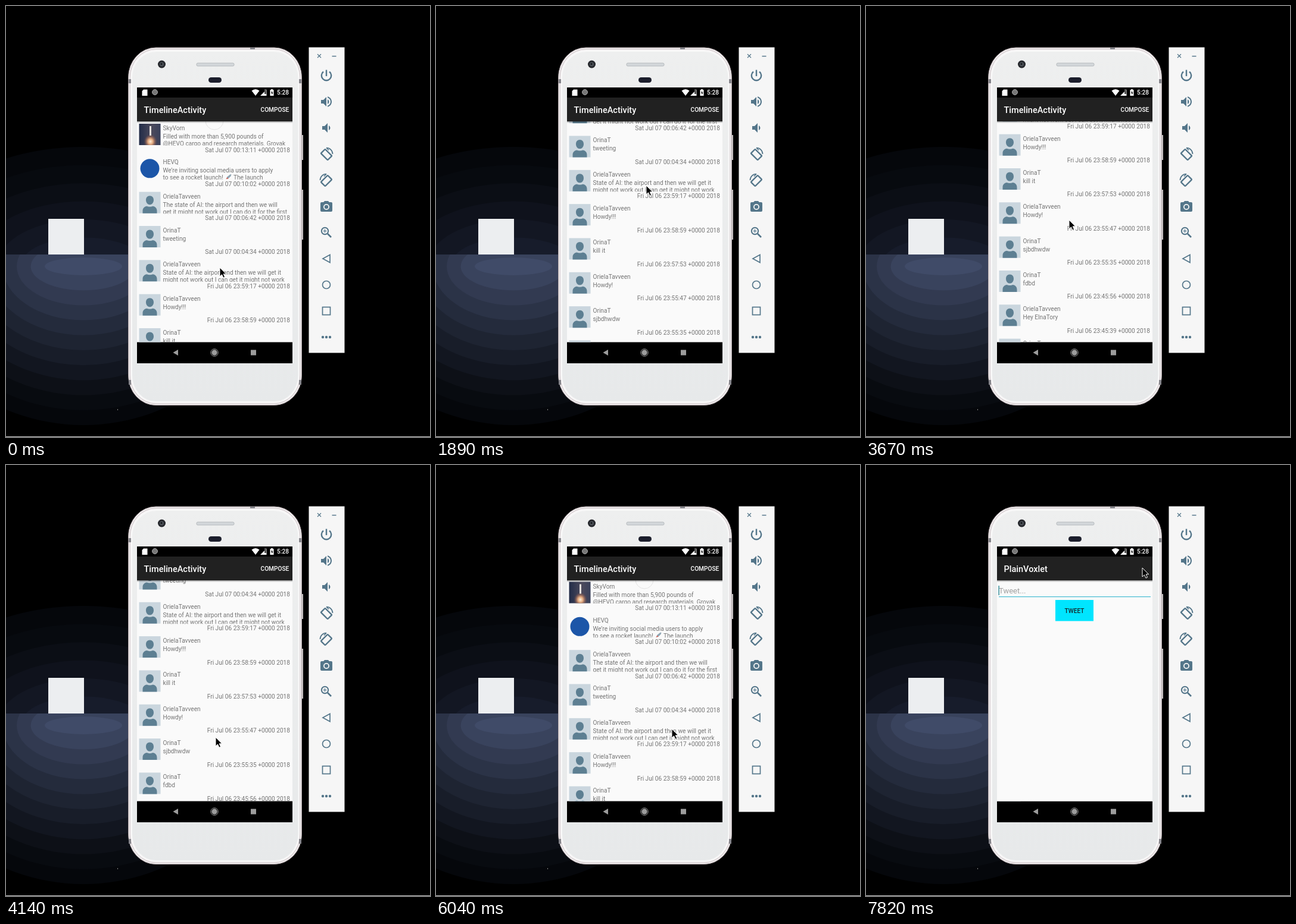
These frames come from a looping animation (712x725 px, 8 s). An HTML page:

```html
<!DOCTYPE html>
<html lang="en">
<head>
<meta charset="utf-8">
<title>Timeline</title>
<style>
html, body { margin: 0; height: 100%; overflow: hidden; background: #000; }
#stage { display: block; width: 100vw; height: 100vh; }
text { font: 10.15px Roboto, sans-serif; fill: #757575; }
.bar { font-size: 14.5px; font-weight: 500; fill: #fff; }
.med { font-weight: 500; fill: #fff; }
.line { fill: none; stroke: #54768a; }
.solid { fill: #54768a; }
</style>
</head>
<body>
<svg id="stage" viewBox="0 0 712 725">
  <defs>
    <linearGradient id="body" x2="0" y2="1">
      <stop stop-color="#eeefef"/><stop offset="1" stop-color="#e7e9ea"/>
    </linearGradient>
    <linearGradient id="sky">
      <stop stop-color="#222c48"/><stop offset=".6" stop-color="#4c4a5c"/><stop offset="1" stop-color="#39405a"/>
    </linearGradient>
    <radialGradient id="fire" cx=".5" cy=".75" r=".5">
      <stop stop-color="#fff0da"/><stop offset=".4" stop-color="#e0a67c"/><stop offset="1" stop-color="#8a4a3c" stop-opacity="0"/>
    </radialGradient>
    <linearGradient id="shade" x2="0" y2="1">
      <stop stop-opacity=".4"/><stop offset="1" stop-opacity="0"/>
    </linearGradient>
    <g id="person">
      <rect width="36" height="36" fill="#cad6de"/>
      <path fill="#5d7f92" d="M18 6.500c4 0 6.500 3 6.500 7.200S22 21.500 18 21.500s-6.500-3.600-6.500-7.800S14 6.500 18 6.500ZM6 36v-4c0-4.800 3-7.400 7-8 3 1.400 7 1.400 10 0 4 .6 7 3.200 7 8v4Z"/>
    </g>
    <g id="launch">
      <rect width="36" height="36" fill="url(#sky)"/>
      <rect x="8" y="12" width="22" height="24" fill="url(#fire)"/>
      <rect x="17.500" y="4" width="3" height="16" fill="#e4dfdc"/>
    </g>
    <circle id="badge" cx="18" cy="18" r="16" fill="#1c56a8"/>
    <g id="turn">
      <rect class="line" x="-5" y="-8" width="10" height="16" rx="1" stroke-width="2.400" transform="translate(0 1) rotate(-45)"/>
      <path class="line" stroke-width="1.700" d="M0-10.500A10.500 10.500 0 0 1 10.500 0M0-10.500l4 4"/>
    </g>
  </defs>

  <rect width="712" height="725"/>
  <svg id="upper" width="712" height="418"></svg>
  <svg id="lower" y="418" width="712" height="306" viewBox="0 418 712 306"></svg>
  <rect x="71" y="358" width="60" height="60" fill="#eceef0"/>
  <rect x="187" y="678" width="1" height="2" fill="#888"/>
  <rect y="724" width="712" height="1" fill="#cfcfcf"/>

  <!-- phone -->
  <path fill="#c8c3c4" d="M495 217h4v42h-4ZM495 309h4v84h-4Z"/>
  <rect x="205.500" y="70" width="291" height="601.500" rx="46" ry="50" fill="#f6f3f4" stroke="#a89da0"/>
  <rect x="208" y="72.500" width="286" height="596.500" rx="44" ry="48" fill="none" stroke="#c9c0c3"/>
  <rect x="211" y="76" width="280.500" height="590" rx="41" ry="45" fill="url(#body)" stroke="#f8f8f8" stroke-width="2"/>
  <path fill="#85858b" d="M206 123h4v7h-4ZM492 123h4v7h-4ZM206 629h4v8h-4ZM492 629h4v8h-4ZM410 70h8v3h-8Z"/>
  <circle cx="261.500" cy="98" r="6.500" fill="#26282d"/>
  <circle cx="261.500" cy="98" r="3.500" fill="#4b5057"/>
  <circle cx="261" cy="97.500" r="1.500" fill="#15171b"/>
  <rect x="320" y="96" width="63" height="5" rx="2" fill="#d3d7da" stroke="#b7bbbe"/>
  <rect x="340" y="120" width="22" height="9" rx="4.500" fill="#1c1e2c"/>

  <!-- status and navigation bars -->
  <rect x="220" y="137" width="261" height="464"/>
  <path fill="#fff" d="M231 140.500h6.500v10.500h-9v-8ZM412.500 142.500q6.500-5 13 0L419 151ZM437.500 140.500V151H427ZM445 140h3v1h1.500v10h-6v-10h1.500Z"/>
  <path d="M434 140v8h3v-8Z" fill="#555"/>
  <path d="M447 142.500l-2 4h1.500v3l2-4H447Z"/>
  <circle cx="250" cy="145" r="4.500" fill="#777" stroke="#a5a5a5"/>
  <text class="med" x="455" y="149">5:28</text>
  <g fill="#9c9c9c">
    <path d="M280.500 583l8.500-5v10ZM411 578.500h9v9h-9Z"/>
    <circle cx="350" cy="583" r="4.700"/>
    <circle cx="350" cy="583" r="6.200" fill="none" stroke="#9c9c9c"/>
  </g>

  <!-- timeline page -->
  <svg x="220" y="194" width="261" height="371.500" viewBox="220 194 261 371.500">
    <rect x="220" y="194" width="261" height="372" fill="#fafafa"/>
    <g id="list"></g>
    <circle id="spinner" cx="350" cy="193" r="15" fill="#fafafa" stroke="#e2e2e2"/>
    <rect x="220" y="194" width="261" height="3" fill="url(#shade)"/>
  </svg>
  <rect x="220" y="154" width="261" height="40" fill="#212121"/>
  <text class="bar" x="231.500" y="179.700">TimelineActivity</text>
  <text class="med" x="475.300" y="178" text-anchor="end">COMPOSE</text>

  <!-- compose page -->
  <svg x="220" y="154" width="261" height="411.500" viewBox="220 154 261 411.500">
    <g id="compose">
      <rect x="220" y="154" width="261" height="412" fill="#fafafa"/>
      <rect x="220" y="194" width="261" height="3" fill="url(#shade)"/>
      <rect x="220" y="154" width="261" height="40" fill="#212121"/>
      <text class="bar" x="231.500" y="179.700">PlainVoxlet</text>
      <text x="223" y="216" style="font-size:13px;fill:#a0a0a0">Tweet...</text>
      <rect x="222.500" y="203" width="1.300" height="16" fill="#1d7f8c"/>
      <rect x="223" y="221" width="255" height="1.200" fill="#45bcd3"/>
      <rect x="318" y="227" width="64" height="35.500" fill="#00e5ff"/>
      <text class="med" x="350" y="248.500" text-anchor="middle" style="fill:#142326">TWEET</text>
    </g>
  </svg>

  <!-- side toolbar -->
  <rect x="508.500" y="69.500" width="60" height="514" fill="#f6f6f6"/>
  <path class="line" stroke-width="1.300" d="M523 81l6 6m0-6l-6 6M547.500 84.500h7"/>
  <path class="line" stroke-width="2.400" d="M533 110.500A8.200 8.200 0 1 0 543 110.500M538 107.500V118"/>
  <path class="solid" transform="translate(526 149)" d="M3 9v6h4l5 5V4L7 9H3zm13.500 3c0-1.770-1.020-3.290-2.500-4.030v8.050c1.480-.73 2.500-2.250 2.500-4.020zM14 3.230v2.060c2.890.86 5 3.540 5 6.710s-2.110 5.850-5 6.710v2.060c4.010-.91 7-4.490 7-8.770s-2.990-7.860-7-8.770z"/>
  <path class="solid" transform="translate(526 193)" d="M18.500 12c0-1.770-1.020-3.290-2.500-4.030v8.050c1.480-.73 2.500-2.250 2.500-4.020zM5 9v6h4l5 5V4L9 9H5z"/>
  <use href="#turn" transform="translate(538 249)"/>
  <use href="#turn" transform="translate(538 293) scale(-1 1)"/>
  <path class="solid" d="M535 328h6l1.800 2H546q2 0 2 2v12q0 2-2 2h-16q-2 0-2-2v-12q0-2 2-2h3.200Z"/>
  <circle cx="538" cy="338" r="4.100" fill="none" stroke="#f6f6f6" stroke-width="1.800"/>
  <path class="line" stroke-width="2.600" d="M540 383l6 6"/>
  <circle class="line" stroke-width="2" cx="535.500" cy="378.500" r="5.700"/>
  <path class="line" stroke-width="1.200" d="M532.500 378.500h6m-3-3v6"/>
  <g class="line" stroke-width="1.700">
    <path d="M532 425l12-6.500v13Z"/>
    <circle cx="538" cy="469" r="6.500"/>
    <rect x="531.500" y="506.500" width="13" height="13"/>
  </g>
  <path class="line" stroke-width="4.400" stroke-linecap="round" d="M532 557h0m6 0h0m6 0h0"/>

  <path id="cursor" stroke="#fff" d="M0-1V14L3.500 10.800 6 16.200 8.500 15 6.200 9.800H10.700Z"/>
</svg>
<script>
const $ = id => document.getElementById(id);
const PITCH = 57.33, TOP = 198, LOOP = 8000, TICK = 118.4;

// Banded glow: nested ellipses from a dark rim to a brighter core
function glow(id, n, cy, height, core) {
  let s = '';
  for (let i = 0; i < n; i++) {
    const u = i / (n - 1), light = u ** 1.25;
    const rgb = core.map((c, j) => Math.round([5, 7, 11][j] * (1 - light) + c * light));
    s += `<ellipse cx="130" cy="${cy}" rx="${300 - 235 * u}" ry="${height + (15 - height) * u}" fill="rgb(${rgb})"/>`;
  }
  $(id).innerHTML = s;
}
glow('upper', 7, 435, 198, [28, 34, 51]);
glow('lower', 11, 438, 267, [64, 75, 104]);

const A = 'OrielaTavveen', B = 'OrinaT';
const SAT = 'Sat Jul 07 ', FRI = 'Fri Jul 06 ';
const posts = [
  ['SkyVorn', SAT + '00:13:11', 'Filled with more than 5,900 pounds of', '@HEVQ cargo and research materials. Grovak'],
  ['HEVQ', SAT + '00:10:02', 'We’re inviting social media users to apply', 'to see a rocket launch!'],
  [A, SAT + '00:06:42', 'The state of AI: the airport and then we will', 'get it might not work out I can do it for the first'],
  [B, SAT + '00:04:34', 'tweeting'],
  [A, FRI + '23:59:17', 'State of AI: the airport and then we will get it', 'might not work out I can get it might not work'],
  [A, FRI + '23:58:59', 'Howdy!!!'],
  [B, FRI + '23:57:53', 'kill it'],
  [A, FRI + '23:55:47', 'Howdy!'],
  [B, FRI + '23:55:35', 'sjbdhwdw'],
  [B, FRI + '23:45:56', 'fdbd'],
  [A, FRI + '23:45:39', 'Hey ElnaTory'],
  [B, FRI + '23:45:12', 'hello'],
  [A, FRI + '23:44:50', 'Hi']
];
const rocket = `<path d="M146 36l2-4 5-4h2l-1 3-4 4Z" fill="#8fa6b5"/><path d="M146 36l2-3 2 2Z" fill="#e05a4a"/>
  <text x="158.500" y="37">The launch</text>`;

$('list').innerHTML = posts.map(([name, date, one, two = ''], i) => `
  <g transform="translate(223.500 ${TOP + i * PITCH})">
    <use href="#${['launch', 'badge'][i] || 'person'}"/>
    <text x="40" y="11">${name}</text>
    <svg width="254" height="36.500">
      <text x="40" y="25">${one}</text><text x="40" y="37">${two}</text>${i == 1 ? rocket : ''}
    </svg>
    <text x="253.500" y="47.500" text-anchor="end">${date} +0000 2018</text>
  </g>`).join('');

// Keys: [tick, values...]
const scroll = [[0, 0], [7, 0], [11, -26], [13, -78], [19, -225], [22, -261], [25, -288], [27, -288],
  [31, -269], [40, -106], [41, -102], [45, -102], [50, -12], [51, -1.5], [52, 0]];
const pointer = [[0, 359, 441], [4, 367, 493], [5, 367, 493], [11, 361, 320], [22, 344, 283], [26, 342, 283],
  [31, 341, 361], [39, 362, 556], [40, 362, 549], [42, 362, 549], [44, 382, 309], [45, 382, 309],
  [51, 396, 445], [52, 396, 446], [57, 467, 168], [59, 463, 173], [60, 464, 174]];

function at(keys, k) {
  const n = keys.findIndex(key => key[0] > k);
  if (n < 0) return keys[keys.length - 1].slice(1);
  const a = keys[n - 1], b = keys[n], u = (k - a[0]) / (b[0] - a[0]);
  return a.slice(1).map((v, i) => v + (b[i + 1] - v) * u);
}
const clamp = v => Math.max(0, Math.min(1, v));

function draw(now) {
  const k = Math.floor((now % LOOP + 10) / TICK);
  $('list').setAttribute('transform', `translate(0 ${at(scroll, k)[0]})`);
  $('cursor').setAttribute('transform', `translate(${at(pointer, k).map(Math.round)})`);
  const pull = k < 4 ? 1 - k / 3 : clamp((k - 48) / 3);
  $('spinner').setAttribute('cy', 175 + 18 * pull);
  const open = clamp((k - 62) / 4);
  $('compose').setAttribute('opacity', open);
  $('compose').setAttribute('transform', `translate(0 ${33 * (1 - open) ** 2})`);
  requestAnimationFrame(draw);
}
requestAnimationFrame(draw);
</script>
</body>
</html>
```
